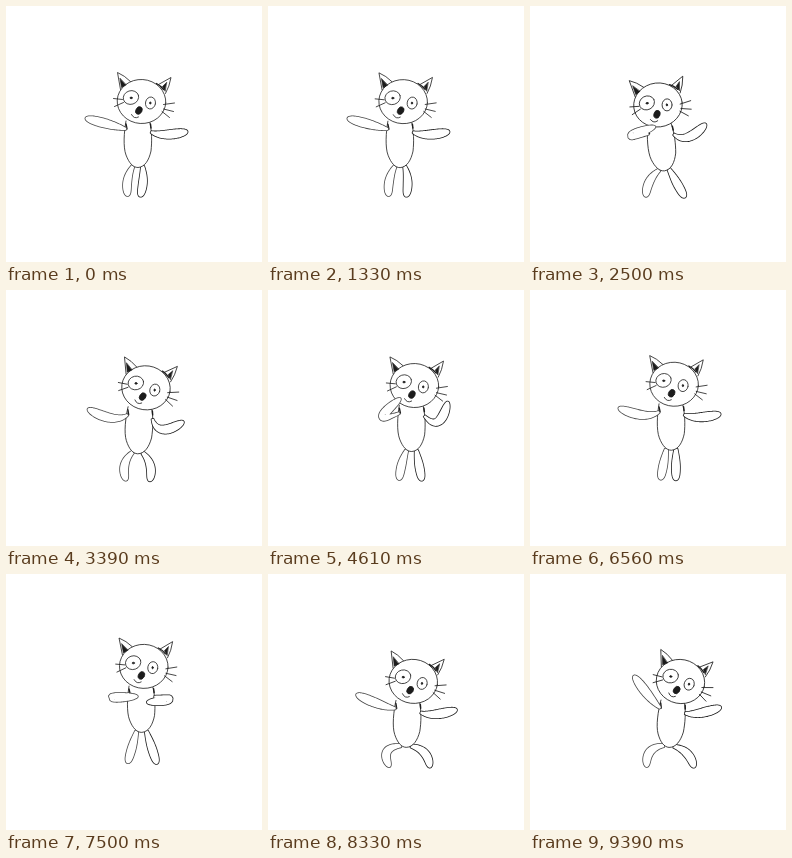
Recreate the animation shown at these times as an HTML page with a canvas. Size 256 by 256 pixels, loop 9450 ms.

```html
<!DOCTYPE html>
<html lang="en">
<head>
<meta charset="utf-8">
<title>Dancing cat</title>
<style>
html, body { margin: 0; width: 100%; height: 100%; overflow: hidden; background: #fff; }
canvas { display: block; width: 100vw; height: 100vh; }
</style>
</head>
<body>
<canvas id="stage" width="256" height="256"></canvas>
<script>
const ctx = document.getElementById('stage').getContext('2d');
const LOOP = 9450, FPS = 18, FRAMES = 170;
const INK = '#1c1c1c', PALE_INK = '#484848', PAPER = '#fff', LINE = 0.8;

// A passing movement centred on a moment, in seconds.
const bump = (t, centre, width) => Math.exp(-(((t - centre) / width) ** 2));

// An eased change from 0 to 1 that stays.
function ramp(t, from, to) {
  const u = Math.min(1, Math.max(0, (t - from) / (to - from)));
  return u * u * (3 - 2 * u);
}

// Arm angles are in degrees: 0 points outward, 90 up, 180 across the body.
function poseAt(t) {
  const x = 132 + 20 * bump(t, 5.5, 1.2) + 9 * ramp(t, 6.8, 9);
  const y = 138 + 4 * bump(t, 2.8, 0.8) - 4 * bump(t, 7.2, 0.6) + 12 * ramp(t, 7.6, 8.2);
  const lean = -10.5 * bump(t, 2.4, 0.6) + 6 * bump(t, 3.5, 0.5) - 1.5 * ramp(t, 3, 4.6) +
    8.5 * bump(t, 5.6, 0.6) + 9.5 * ramp(t, 7.6, 9);
  const spread = bump(t, 2.5, 0.9) + 0.45 * bump(t, 4.4, 0.6) + ramp(t, 6, 8.5);
  const footY = 190 + (y - 138) / 4;
  return {
    body: [x, y, lean * 0.6],
    head: [x + 3.5 + lean * 0.75, y - 42.5, lean],
    leftArm: {
      upper: 15 - 26 * ramp(t, 1.2, 3) + 58 * ramp(t, 7.6, 9.2),
      fore: 15 + 144 * bump(t, 2.5, 0.5) + 115 * bump(t, 4.6, 0.45) + 110 * bump(t, 5.5, 0.5) +
        163 * bump(t, 7.5, 0.4) + 38 * ramp(t, 8, 9.3)
    },
    rightArm: {
      upper: -10 - 35 * bump(t, 3.4, 0.5) - 12 * bump(t, 4.6, 0.4) - 32 * bump(t, 5.7, 0.4) +
        10 * ramp(t, 8, 9),
      fore: 8 + 29 * bump(t, 2.5, 0.5) + 12 * bump(t, 3.4, 0.4) + 56 * bump(t, 4.6, 0.4) +
        120 * bump(t, 5.7, 0.35) + 180 * bump(t, 7.5, 0.4) + 8 * ramp(t, 8, 9)
    },
    leftFoot: [x - 10 - 6 * spread - 8 * ramp(t, 8, 9.3), footY],
    rightFoot: [x + 2 + 21 * spread, footY + 0.7]
  };
}

const radians = deg => deg * Math.PI / 180;

function place([x, y, deg], px, py) {
  const c = Math.cos(radians(deg)), s = Math.sin(radians(deg));
  return [x + px * c - py * s, y + px * s + py * c];
}

function within([x, y, deg], draw) {
  ctx.save();
  ctx.translate(x, y);
  ctx.rotate(radians(deg));
  draw();
  ctx.restore();
}

function ink(path, fill, width = LINE) {
  const p = new Path2D(path);
  if (fill) { ctx.fillStyle = fill; ctx.fill(p); }
  ctx.lineWidth = width;
  ctx.stroke(p);
}

function oval(x, y, rx, ry, tilt, fill) {
  ctx.beginPath();
  ctx.ellipse(x, y, rx, ry, tilt, 0, Math.PI * 2);
  if (fill) { ctx.fillStyle = fill; ctx.fill(); }
  ctx.lineWidth = LINE;
  ctx.stroke();
}

// A soft limb bent through its middle joint; radius(t) is its half width.
function limb(start, joint, end, radius, color) {
  const ctrl = [0, 1].map(k => 2 * joint[k] - (start[k] + end[k]) / 2);
  const left = [], right = [], steps = 48;
  for (let i = 0; i <= steps; i++) {
    const t = Math.sin(i / steps * Math.PI / 2), v = 1 - t;
    const p = [0, 1].map(k => v * v * start[k] + 2 * v * t * ctrl[k] + t * t * end[k]);
    const d = [0, 1].map(k => v * (ctrl[k] - start[k]) + t * (end[k] - ctrl[k]));
    const n = radius(t) / (Math.hypot(d[0], d[1]) || 1);
    left.push([p[0] - d[1] * n, p[1] + d[0] * n]);
    right.unshift([p[0] + d[1] * n, p[1] - d[0] * n]);
  }
  ctx.beginPath();
  left.concat(right).forEach(p => ctx.lineTo(p[0], p[1]));
  ctx.closePath();
  ctx.strokeStyle = color;
  ctx.lineWidth = LINE * 2;
  ctx.stroke();
  ctx.fillStyle = PAPER;
  ctx.fill();
}

// Half width that swells from the joint and closes in a round tip.
const swell = (thin, fat, rate) => t =>
  (thin + fat * Math.sin(Math.min(1, t * rate) * Math.PI / 2)) * Math.sqrt(1 - t ** 8);
const armWidth = swell(1, 3.6, 1.25), legWidth = swell(1.6, 2.5, 1.6);

function arm(shoulder, { upper, fore }, side, length, color) {
  const reach = ([x, y], deg, size) =>
    [x + side * size * Math.cos(radians(deg)), y - size * Math.sin(radians(deg))];
  const elbow = reach(shoulder, upper, length * 0.4);
  limb(shoulder, elbow, reach(elbow, fore, length * 0.6), armWidth, color);
}

// Two equal bones: the knee moves outward when the leg is short.
function leg(hip, foot, side, color) {
  const bone = 15.5, dx = foot[0] - hip[0], dy = foot[1] - hip[1];
  const dist = Math.hypot(dx, dy);
  const bend = Math.sqrt(Math.max(0, bone * bone - dist * dist / 4)) * side;
  const knee = [hip[0] + dx / 2 + dy / dist * bend, hip[1] + dy / 2 - dx / dist * bend];
  limb(hip, knee, foot, legWidth, color);
}

function drawTorso() {
  ink('M-12-23C-14-12-15 3-12 11C-9 19-5 23.5 0 23.5C7 23 11 16 13 7C14-2 14-13 11.5-23', PAPER);
  ink('M-12-20L-11-15M12.5-20L13-16', null, 1.4);
}

function drawHead() {
  ink('M-21-12L-24-29Q-17-26-11-20', PAPER);
  ink('M17-17L29.5-24Q28-15 24-8', PAPER);
  oval(0, 0, 24.3, 22, 0.06, PAPER);
  ink('M-21.5-23L-20-14L-15.5-16.5Z', INK, 0.6);
  ink('M25-19L21-15L23.5-10.5Z', INK, 0.6);
  ink('M15-18Q19-16 22-12', null, 1.3);
  oval(-10.5, -4, 7.8, 6.8, -0.3);
  oval(9, 1.5, 5, 6, 0.2);
  oval(-10.3, -3.6, 1.2, 0.8, 0, INK);
  oval(8.8, 1.5, 0.7, 1.1, 0, INK);
  oval(-2.6, 9, 3, 4, 0.5, INK);
  ink('M-10 13Q-7.5 18-3 15.5');
  ink('M-28-3L-19-2M-27 5L-18 1M22 3L33 1.5M22 7.5L32 10M20.5 10L28 16');
}

function draw(seconds) {
  const pose = poseAt(seconds), { body } = pose;
  ctx.fillStyle = PAPER;
  ctx.fillRect(0, 0, 256, 256);
  ctx.lineCap = ctx.lineJoin = 'round';
  leg(place(body, -5, 22), pose.leftFoot, -1, PALE_INK);
  leg(place(body, 4.5, 22), pose.rightFoot, 1, INK);
  within(body, drawTorso);
  within(pose.head, drawHead);
  arm(place(body, -12, -15), pose.leftArm, -1, 42, PALE_INK);
  arm(place(body, 13, -12), pose.rightArm, 1, 37, INK);
}

function tick() {
  const t = performance.now() % LOOP;
  const frame = Math.min(FRAMES - 1, Math.floor((Math.floor(t / 10) + 0.5) * FPS / 100));
  draw(frame / FPS);
  requestAnimationFrame(tick);
}
tick();
</script>
</body>
</html>
```
